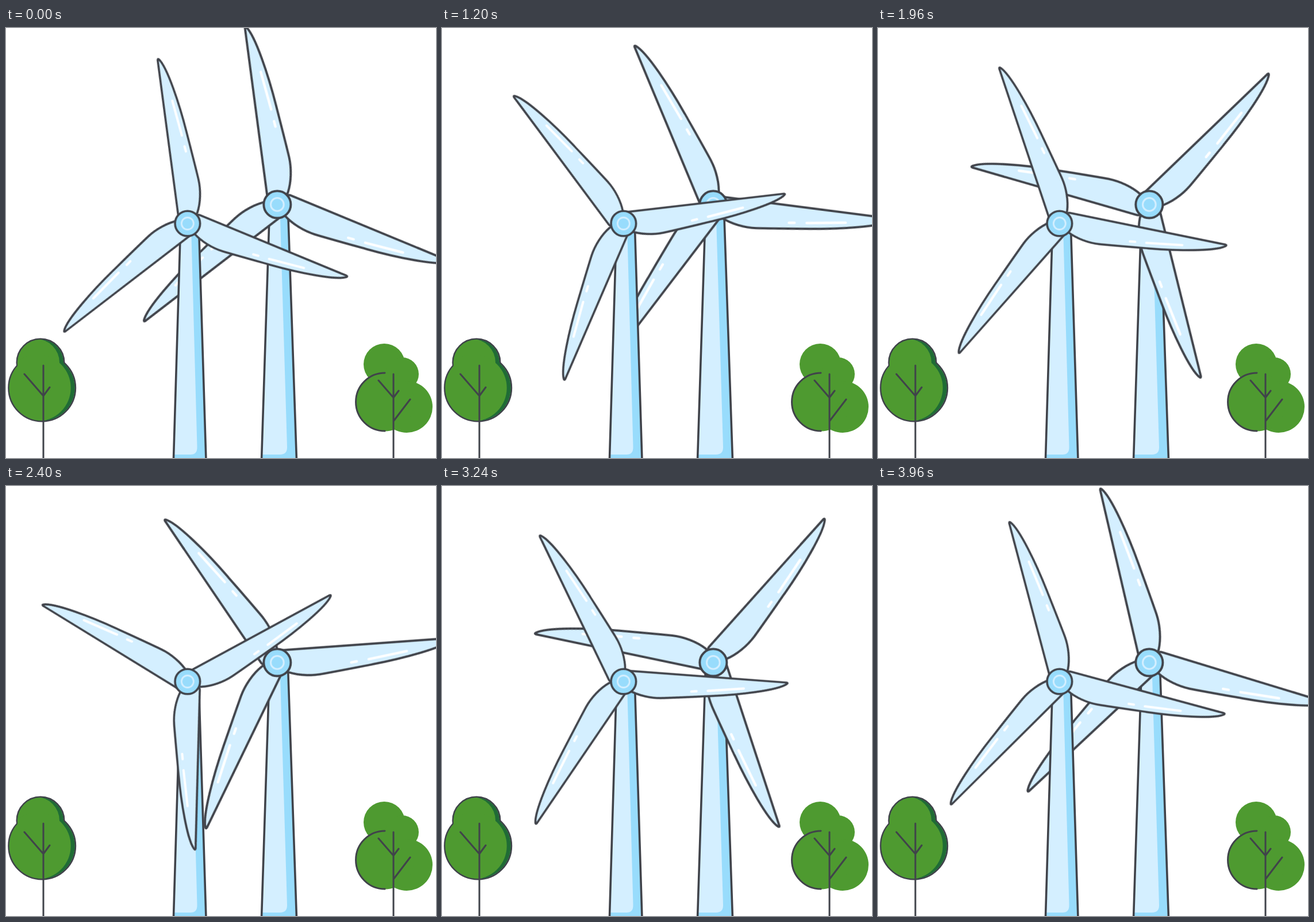
Write an HTML page that moves like this. It is 748 px wide and 748 px high and loops after 4040 ms.

```html
<!DOCTYPE html>
<html lang="en">
<head>
<meta charset="utf-8">
<title>Wind turbines</title>
<style>
  html, body { margin: 0; width: 100%; height: 100%; overflow: hidden; background: #fff; }
  svg { display: block; width: 100vw; height: 100vh; }

  .line { fill: none; stroke: #40434a; stroke-width: 3; stroke-linecap: round; stroke-linejoin: round; }
  .edge { stroke: #40434a; stroke-width: 3.6; stroke-linejoin: round; }
  .pale { fill: #d4efff; }
  .blue { fill: #98dcfc; }
  .leaf { fill: #4e9a30; }
  .shade { fill: #1f6c35; }
  .ring { fill: none; stroke: #d4efff; stroke-width: 2.8; }
  .shine { fill: none; stroke: #fff; stroke-width: 4; stroke-linecap: round; }

  /* Both rotors hold briefly at each end of the loop. */
  .rotor { animation: spin 4040ms steps(98) -1ms infinite; }
  .fast { --turn: 712.727deg; }
  .slow { --turn: 354.5deg; }
  @keyframes spin {
    0%, 0.990099% { transform: rotate(0deg); }
    98.019802%, 100% { transform: rotate(var(--turn)); }
  }
</style>
</head>
<body>
<svg viewBox="0 0 748 748" xmlns="http://www.w3.org/2000/svg">
  <defs>
    <g id="blade">
      <path class="pale edge" d="M-17.7-12L-1.1-287.6Q-.4-291 1.4-288.4C13-272 21.5-205 24.3-156C27-110 28.5-85 29-70C29.6-52 25-30 16-14L0 0L-13-6Q-18-7-17.7-12Z"/>
      <path class="shine" d="M10.4-213.5L15.3-151M16.2-131.5L16.8-122.5"/>
    </g>
    <g id="blades" transform="translate(4 -2) rotate(-11)">
      <use href="#blade"/>
      <use href="#blade" transform="rotate(120)"/>
      <use href="#blade" transform="rotate(240)"/>
    </g>
    <g id="hub">
      <circle class="blue edge" r="21.8"/>
      <circle class="ring" r="10.5"/>
    </g>
    <g id="crown">
      <circle cx="60" cy="582" r="41"/>
      <circle cx="62.7" cy="626" r="58"/>
    </g>
    <clipPath id="crownClip">
      <circle cx="60" cy="582" r="40"/>
      <circle cx="62.7" cy="626" r="57"/>
    </clipPath>
  </defs>

  <!-- left tree -->
  <use href="#crown" class="line"/>
  <g clip-path="url(#crownClip)">
    <use href="#crown" class="shade"/>
    <use href="#crown" class="leaf" x="-8"/>
  </g>
  <path class="line" d="M65 587V750M32 602L65 640L76 625"/>

  <!-- right tree -->
  <g class="leaf">
    <circle cx="658" cy="585" r="36"/>
    <circle cx="689" cy="602" r="29"/>
    <circle cx="697" cy="659" r="45"/>
    <circle cx="659" cy="650.5" r="51"/>
  </g>
  <path class="line" d="M659 600A50.5 50.5 0 0 0 659 701M674 602V750M648 613L674 643L683 631M674 684L703 646"/>

  <!-- back turbine -->
  <path class="blue" d="M458.5 315L444.5 752H505.5L490.5 315Z"/>
  <path class="pale" d="M458.5 315H476.5L489 729Q489.3 742 477 742H445Z"/>
  <path class="line edge" d="M444.5 752L458.5 315H490.5L505.5 752"/>
  <g transform="translate(471.8 307) scale(1.08)">
    <g class="rotor slow"><use href="#blades"/></g>
    <use href="#hub"/>
  </g>

  <!-- front turbine -->
  <path class="blue" d="M303.6 345L291.4 752H348L335.4 345Z"/>
  <path class="pale" d="M303.6 345H322L332.5 729Q332.8 742 321 742H291.7Z"/>
  <path class="line edge" d="M291.4 752L303.6 345H335.4L348 752"/>
  <g transform="translate(315.8 340.1)">
    <g class="rotor fast"><use href="#blades"/></g>
    <use href="#hub"/>
  </g>
</svg>
</body>
</html>
```
